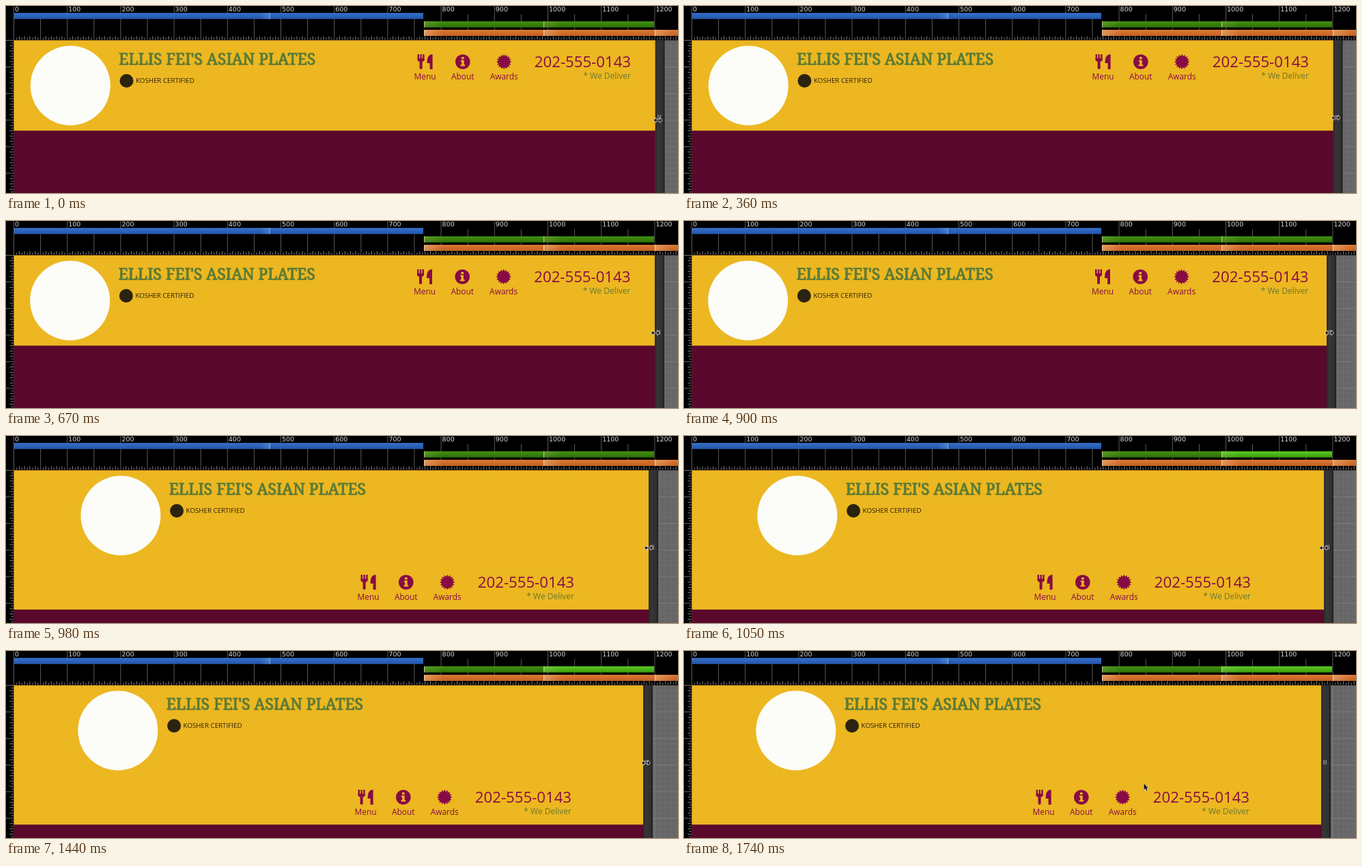
An HTML page with a canvas for the animation above (1.83 s loop, 984 px wide and 275 px high).

```html
<!DOCTYPE html>
<html lang="en">
<head>
<meta charset="utf-8">
<title>Responsive header</title>
<style>
html, body { margin: 0; width: 100%; height: 100%; overflow: hidden; background: #000; }
canvas { display: block; }
</style>
</head>
<body>
<canvas id="stage" width="984" height="275"></canvas>
<script>
const ctx = document.getElementById('stage').getContext('2d');
const W = 984, H = 275, LOOP = 1830;
const HOLD = 130, STEP = 76.6;
const LEFT = 11.5, TOP = 50.5, UNIT = 0.782;
const YELLOW = '#ecb720', MAROON = '#5a082c', WINE = '#880b45', GREEN = '#587c38';
const SANS = '"Open Sans", "Noto Sans", sans-serif';
const SERIF = '"Noto Serif", serif';

const ramp = (t, from, to) => Math.min(1, Math.max(0, (t - from) / (to - from)));

// The picture holds first, then advances in even steps.
function stepTime(now) {
  return now < HOLD ? 0 : HOLD + Math.floor((now - HOLD) / STEP) * STEP;
}

// The right border is dragged inwards in two pulls.
function edgeAt(t) {
  return 950.6 - 9.6 * ramp(t, 650, 890) - 8 * ramp(t, 973, 1126);
}

// The pointer leads the drag by one step, then swings away to the left.
function pointerAt(t) {
  const away = ramp(t, 1432, 1738) ** 2;
  return {
    x: edgeAt(t + STEP) + 4 - 263.5 * away,
    y: 168 - 3.5 * ramp(t, 0, 350) + 30.5 * away - 40 * Math.sin(Math.PI * away),
    resizing: away < 0.05
  };
}

function rect(x, y, w, h, fill) {
  ctx.fillStyle = fill;
  ctx.fillRect(x, y, w, h);
}

function disc(x, y, r, fill) {
  ctx.fillStyle = fill;
  ctx.beginPath();
  ctx.arc(x, y, r, 0, 7);
  ctx.fill();
}

function trace(points) {
  ctx.beginPath();
  points.forEach(([x, y]) => ctx.lineTo(x, y));
  ctx.closePath();
}

function text(str, x, y, size, fill, align = 'left', family = SANS, weight = 400) {
  ctx.font = `${weight} ${size}px ${family}`;
  ctx.textAlign = align;
  ctx.fillStyle = fill;
  ctx.fillText(str, x, y);
}

function blend(x0, y0, x1, y1, ...colors) {
  const g = ctx.createLinearGradient(x0, y0, x1, y1);
  colors.forEach((c, i) => g.addColorStop(i / (colors.length - 1), c));
  return g;
}

function bar(x0, x1, y, light, dark, sheen = 0) {
  rect(x0, y, x1 - x0, 9, blend(0, y, 0, y + 9, light, dark));
  if (!sheen) return;
  rect(x0, y, 28, 9, blend(x0, 0, x0 + 28, 0, `rgba(255,225,180,${sheen})`, 'rgba(255,225,180,0)'));
  rect(x0, y, 1, 9, 'rgba(255,240,215,.6)');
}

function tickLength(u) {
  return u % 10 ? 3 : 5;
}

function rulers(active) {
  rect(0, 0, W, TOP, '#000');
  rect(0, TOP, LEFT, H - TOP, '#000');
  for (let u = 0; u <= 1245; u += 5) {
    const x = LEFT + u * UNIT - 0.5;
    const y = TOP + u * UNIT - 0.5;
    const len = tickLength(u);
    if (u % 50) {
      rect(x, TOP - 1 - len, 1, len, '#868686');
      rect(LEFT - 1 - len, y, len, 1, '#868686');
    } else {
      const top = u % 100 ? 12 : 0;
      rect(x, top, 1, TOP - top, '#5a5a5a');
      rect(0, y, LEFT, 1, '#6a6a6a');
    }
    if (u % 100 === 0) text(u, x + 2, 8, 9.5, '#d8d8d8', 'left', '"DejaVu Sans", sans-serif');
  }

  bar(12, 611, 10.2, '#3671cb', '#2354aa');
  rect(372, 10.2, 14, 9, blend(372, 0, 386, 0, 'rgba(130,170,230,0)', 'rgba(130,170,230,.35)'));
  rect(386, 10.2, 1, 9, '#7ea5df');

  bar(612, 787, 22.5, '#43920f', '#2c7006', 0.15);
  if (active) bar(787, 949, 22.5, '#5bcb25', '#3a9d0c', 0.15);
  else bar(787, 949, 22.5, '#43920f', '#2c7006', 0.15);

  for (const [x0, x1] of [[612, 787], [787, 950], [950, W]]) {
    bar(x0, x1, 35, '#dc7936', '#c2601f', 0.35);
  }
}

function panel(edge) {
  rect(edge, TOP, W - edge, H - TOP, '#666');
  for (let u = 0; u <= 1245; u += 10) {
    const line = u % 50 ? '#6f6f6f' : '#808080';
    rect(LEFT + u * UNIT - 0.5, TOP, 1, H - TOP, line);
    rect(edge, TOP + u * UNIT - 0.5, W - edge, 1, line);
  }
  rect(edge, TOP, 14, H - TOP, blend(edge, 0, edge + 14, 0, '#292929', '#363636', '#333', '#313131', '#1e1e1e'));
  for (let i = 0; i < 3; i++) rect(Math.round(edge) + 3 + i * 2, 160, 1, 7, '#8f8f8f');
}

function cutlery(x, y) {
  for (let i = 0; i < 3; i++) rect(x - 11 + i * 3.8, y - 11, 2.4, 9, WINE);
  ctx.fillStyle = WINE;
  ctx.beginPath();
  ctx.roundRect(x - 11, y - 5, 10, 5, [0, 0, 4, 4]);
  ctx.roundRect(x - 8, y - 3, 4, 14, 2);
  ctx.fill();
  ctx.beginPath();
  ctx.moveTo(x + 11, y - 11);
  ctx.bezierCurveTo(x + 5, y - 11, x + 3, y - 6, x + 3, y + 2);
  ctx.lineTo(x + 7, y + 2);
  ctx.lineTo(x + 7, y + 11);
  ctx.lineTo(x + 11, y + 11);
  ctx.fill();
}

function info(x, y) {
  disc(x, y, 10.8, WINE);
  rect(x - 1.8, y - 7, 3.6, 3.2, YELLOW);
  rect(x - 3, y - 2.2, 4.8, 2, YELLOW);
  rect(x - 1.6, y - 2.2, 3.4, 8, YELLOW);
  rect(x - 3.2, y + 4.2, 6.6, 2.2, YELLOW);
}

function burst(x, y) {
  trace(Array.from({ length: 32 }, (_, i) => {
    const a = i * Math.PI / 16, r = i % 2 ? 8.4 : 11.2;
    return [x + r * Math.sin(a), y - r * Math.cos(a)];
  }));
  ctx.fillStyle = WINE;
  ctx.fill();
}

function brand(dx) {
  ctx.save();
  ctx.translate(dx, 0);
  disc(94.3, 117, 58.5, '#fcfcf8');
  const name = "ELLIS FEI'S ASIAN PLATES";
  text(name, 165.8, 86.8, 22.8, '#857f2c', 'left', SERIF);
  text(name, 165, 86, 22.8, GREEN, 'left', SERIF);
  ctx.strokeStyle = GREEN;
  ctx.lineWidth = 0.7;
  ctx.strokeText(name, 165, 86);
  disc(176.5, 110, 10, '#2a2310');
  text('KOSHER CERTIFIED', 190, 113.3, 9.75, '#2a1c10', 'left', SANS, 500);
  ctx.restore();
}

function navItem(icon, label, x) {
  icon(x, 82);
  text(label, x, 107.5, 11.9, WINE, 'center', SANS, 500);
}

function nav(dx, dy) {
  ctx.save();
  ctx.translate(dx, dy);
  navItem(cutlery, 'Menu', 613.6);
  navItem(info, 'About', 668.8);
  navItem(burst, 'Awards', 729.2);
  text('202-555-0143', 915, 90.3, 22.2, WINE, 'right');
  text('* We Deliver', 915, 106.8, 12, '#697a32', 'right');
  ctx.restore();
}

function page(edge, stacked) {
  const split = stacked ? 255.3 : 183.3;
  const width = edge - LEFT;
  rect(LEFT, TOP, width, H - TOP, MAROON);
  rect(LEFT, TOP, width, split - TOP, YELLOW);
  // Centred when stacked, otherwise up against the minimum width.
  if (stacked) {
    const shift = (edge - 941) / 2;
    brand(73.6 + shift);
    nav(shift - 83, 133);
  } else {
    const shift = Math.max(edge - 950.6, -0.6);
    brand(shift);
    nav(shift, 0);
  }
}

function resizeArrow() {
  const half = [[0, -0.8], [3, -0.8], [3, -3], [6, 0], [3, 3], [3, 0.8], [0, 0.8]];
  return half.concat(half.map(([x, y]) => [-x, -y]));
}

function plainArrow() {
  return [[0, 0], [0, 9], [2, 7.2], [3.6, 10.6], [5, 10], [3.5, 6.6], [6.3, 6.4]];
}

function pointer({ x, y, resizing }) {
  ctx.save();
  ctx.translate(x, y);
  trace(resizing ? resizeArrow() : plainArrow());
  ctx.lineJoin = 'round';
  ctx.lineWidth = 1.4;
  ctx.strokeStyle = '#e6dfdf';
  ctx.stroke();
  ctx.fillStyle = '#180e12';
  ctx.fill();
  ctx.restore();
}

function draw() {
  const t = stepTime(performance.now() % LOOP);
  const edge = edgeAt(t);
  panel(edge);
  rulers(t > 1040);
  page(edge, t > 960);
  pointer(pointerAt(t));
  requestAnimationFrame(draw);
}
draw();
</script>
</body>
</html>
```
